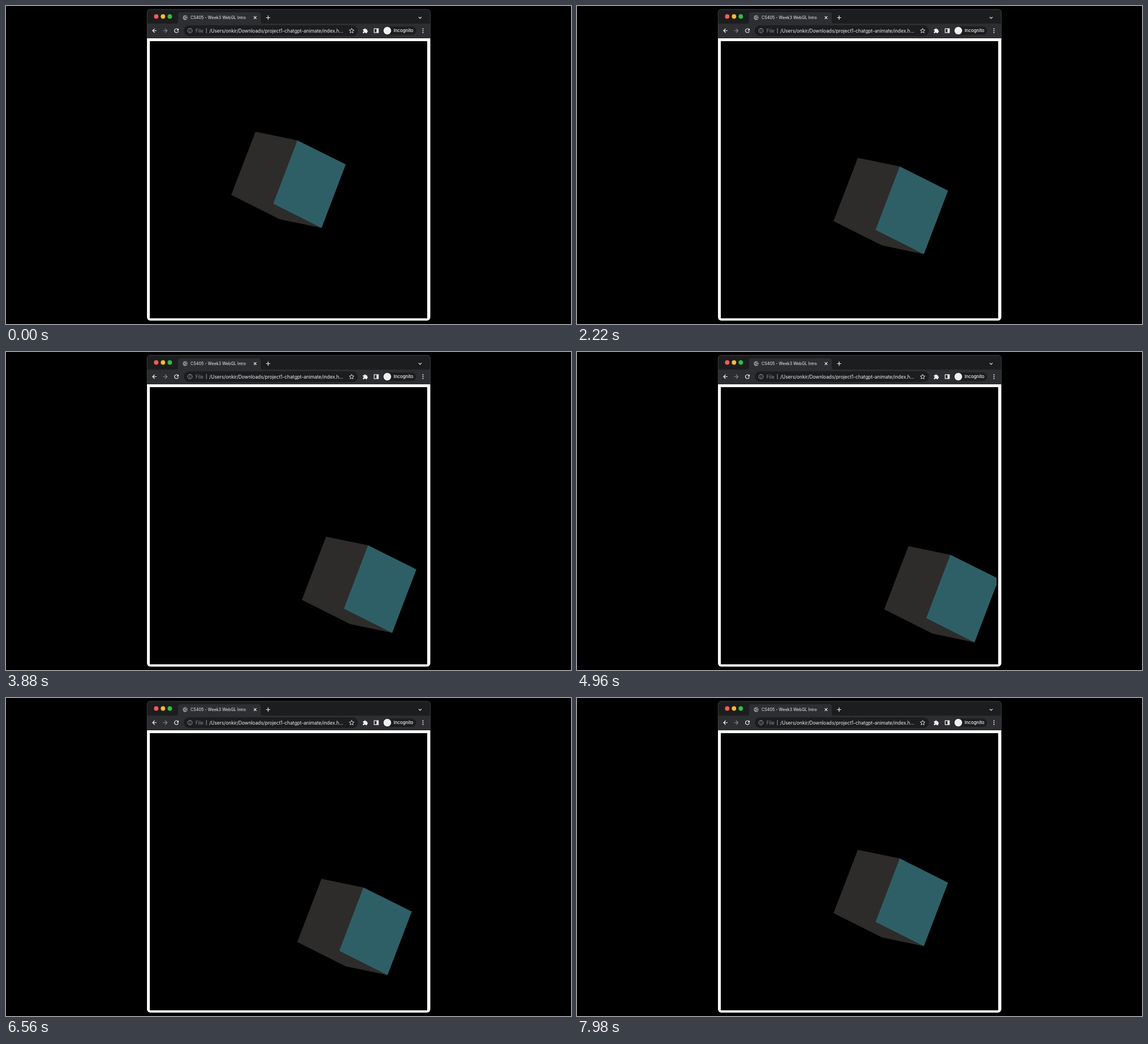
These frames come from a looping animation (998x561 px, 8 s). An HTML page:

```html
<!DOCTYPE html>
<html lang="en">
<head>
<meta charset="utf-8">
<title>Drifting cube</title>
<style>
  html, body { margin: 0; width: 100%; height: 100%; overflow: hidden; background: #000; }
  svg { display: block; width: 100%; height: 100%; }
  text { font: 8.35px Inter, Roboto, sans-serif; fill: #f1f1f2; }
  .tab-title { font-size: 7.16px; }
  .badge { font-size: 7.8px; font-weight: 500; }
  .icon { fill: none; stroke: #f0f0f0; stroke-width: 1.2; }
  .dim { stroke: #85878a; }
</style>
</head>
<body>
<svg viewBox="0 0 998 561">
  <defs>
    <clipPath id="window"><rect x="249" y="5.5" width="500.5" height="549.5" rx="6"/></clipPath>
    <clipPath id="viewport"><rect x="254" y="62" width="487" height="489"/></clipPath>
  </defs>

  <g clip-path="url(#window)">
    <rect x="249" y="5" width="501" height="27" fill="#1c1d1e"/>
    <rect x="249" y="31" width="501" height="26" fill="#2d2e31"/>
    <path d="M300 31q4 0 4-4V15q0-4 4-4h138q4 0 4 4v12q0 4 4 4z" fill="#2d2e31"/>
    <rect x="249" y="57" width="501" height="499" fill="#fff"/>
    <rect x="254" y="62" width="490" height="489" fill="#000"/>
  </g>
  <path d="M249.3 57V11.5q0-5.5 5.5-5.5h189.200h300q5.500 0 5.500 5.500V57" fill="none" stroke="#48494a" stroke-width=".8"/>

  <!-- Tab strip -->
  <circle cx="265.3" cy="18.5" r="3.9" fill="#fb5c54"/>
  <circle cx="277.3" cy="18.5" r="3.9" fill="#f8bb2f"/>
  <circle cx="289.3" cy="18.5" r="3.9" fill="#2bc33f"/>
  <circle cx="316.5" cy="20.500" r="4.200" fill="#94969a"/>
  <path class="icon" style="stroke:#2d2e31;stroke-width:1" d="M313.500 20h2.500v2.500M316 17.500l2 1.500l2-.5M318 23v-1.500h2"/>
  <text class="tab-title" x="326" y="23.1">CS405 - Week3 WebGL Intro</text>
  <path class="icon" d="M437.700 18.200l4.600 4.600m0-4.600l-4.600 4.600"/>
  <path class="icon" d="M459.300 20.500h7.400M463 16.800v7.400" stroke-width="1.4"/>
  <path class="icon" d="M729 19.300l2.500 2.500l2.500-2.500"/>

  <!-- Toolbar -->
  <path class="icon" d="M266 43.500h-7m3.500-3.500l-3.500 3.500l3.500 3.500"/>
  <path class="icon dim" d="M277.500 43.500h7m-3.500-3.500l3.500 3.500l-3.500 3.500"/>
  <path class="icon" d="M303.700 41.200a3.500 3.500 0 1 0 .7 3.300"/>
  <path d="M305 39.500v3.700h-3.700z" fill="#f0f0f0"/>
  <rect x="314" y="34" width="307.500" height="19" rx="9.500" fill="#1c1d1f"/>
  <g class="icon dim" stroke-width="1">
    <circle cx="325" cy="43.500" r="3.800"/>
    <path d="M325 43v2.500M325 41v1M354 39v9"/>
  </g>
  <text x="334.700" y="46.500" style="fill:#8f9195">File</text>
  <text x="359" y="46.500">/Users/onkir/Downloads/project1-chatgpt-animate/index.h...</text>
  <path class="icon" style="stroke-width:.9" d="M610.500 39.300l1.200 2.800l3 .3l-2.300 2l.7 3l-2.600-1.600l-2.600 1.600l.7-3l-2.300-2l3-.3z"/>
  <path d="M630.500 41h2.200a1.400 1.400 0 0 1 2.800 0h2.200v2.300a1.400 1.400 0 0 1 0 2.800v2h-2.500a1.300 1.300 0 0 0-2.600 0h-2.100v-2.500a1.300 1.300 0 0 0 0-2.600z" fill="#f0f0f0"/>
  <rect class="icon" x="650.300" y="40" width="7.400" height="7"/>
  <rect x="654.500" y="40" width="3.500" height="7" fill="#f0f0f0"/>
  <rect x="665.500" y="36" width="59" height="15" rx="7.500" fill="#1c1d1f"/>
  <circle cx="673.500" cy="43.500" r="6.800" fill="#f0f0f0"/>
  <text class="badge" x="684.700" y="46.300">Incognito</text>
  <g fill="#f0f0f0">
    <circle cx="736.500" cy="40.200" r="1"/>
    <circle cx="736.500" cy="43.500" r="1"/>
    <circle cx="736.500" cy="46.800" r="1"/>
  </g>

  <g clip-path="url(#viewport)">
    <g id="cube">
      <path d="M440.500 221.700L514.600 236.900L557 391.500L483 376L397.700 333.200z" fill="#2d2c2b"/>
      <path d="M514.600 236.900L600 279.500L557.300 391.500L472 348.700z" fill="#2f5f66"/>
    </g>
  </g>
</svg>
<script>
  const LOOP = 8000, STEP = 20;
  const SWING = 5000, START = 100;   // one-way travel time and moment of rest
  const TRAVEL_X = 145.2, TRAVEL_Y = 121;
  const cube = document.getElementById('cube');

  function draw(now) {
    const time = Math.floor(now % LOOP / STEP) * STEP;
    const progress = (1 - Math.cos(Math.PI * (time - START) / SWING)) / 2;
    cube.setAttribute('transform', `translate(${TRAVEL_X * progress} ${TRAVEL_Y * progress})`);
    requestAnimationFrame(draw);
  }
  draw(performance.now());
</script>
</body>
</html>
```
